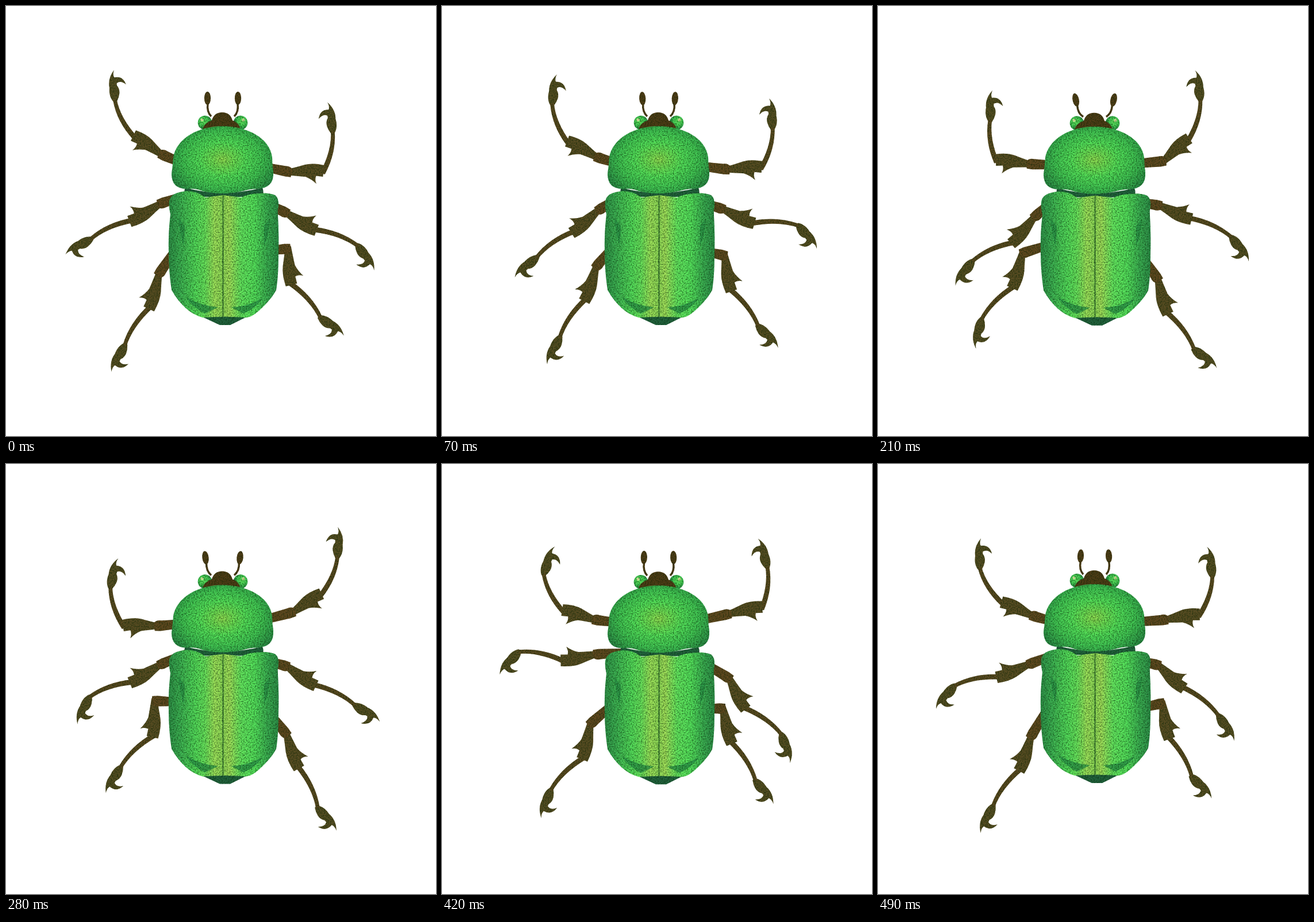
Animation, 748 px wide and 748 px high, one loop 0.56 s. Source, as an HTML page:

```html
<!DOCTYPE html>
<html lang="en">
<head>
<meta charset="utf-8">
<title>Beetle</title>
<style>
  html, body { margin: 0; width: 100%; height: 100%; overflow: hidden; background: #fff; }
  svg { display: block; width: 100vw; height: 100vh; }
  .coxa { fill: #60481f; }
  .femur { fill: #584c22; }
  .tibia { fill: #5a4920; }
  .foot { fill: #554d22; }
  .shade { fill: #2a9146; opacity: .8; }
  .dark { fill: #22633e; }
</style>
</head>
<body>
<svg viewBox="0 0 748 748">
  <defs>
    <filter id="grain" x="-5%" y="-5%" width="110%" height="110%" color-interpolation-filters="sRGB">
      <feTurbulence type="fractalNoise" baseFrequency=".45" numOctaves="2" seed="4"/>
      <feColorMatrix values="0 0 0 0 0  0 0 0 0 .12  0 0 0 0 0  1.3 0 0 0 -.5"/>
      <feComposite in2="SourceGraphic" operator="in" result="specks"/>
      <feMerge><feMergeNode in="SourceGraphic"/><feMergeNode in="specks"/></feMerge>
    </filter>
    <radialGradient id="thorax" gradientUnits="userSpaceOnUse" cx="0" cy="0" r="1"
        gradientTransform="translate(377 267) scale(98 72)">
      <stop offset="0" stop-color="#8fdc52"/>
      <stop offset=".2" stop-color="#6fdf55"/>
      <stop offset=".42" stop-color="#54e05a"/>
      <stop offset=".7" stop-color="#42c654"/>
      <stop offset="1" stop-color="#2c8f47"/>
    </radialGradient>
    <linearGradient id="wings" gradientUnits="userSpaceOnUse" x1="283" x2="474" y1="0" y2="0">
      <stop offset="0" stop-color="#2f9249"/>
      <stop offset=".1" stop-color="#3db153"/>
      <stop offset=".25" stop-color="#55dd5b"/>
      <stop offset=".33" stop-color="#69e45d"/>
      <stop offset=".42" stop-color="#9fe35b"/>
      <stop offset=".49" stop-color="#90dc58"/>
      <stop offset=".55" stop-color="#a3e15b"/>
      <stop offset=".66" stop-color="#65e860"/>
      <stop offset=".78" stop-color="#56e35d"/>
      <stop offset=".9" stop-color="#3cb053"/>
      <stop offset="1" stop-color="#2e8f49"/>
    </linearGradient>
    <radialGradient id="eye" cx=".4" cy=".4" r=".62">
      <stop offset="0" stop-color="#62e860"/>
      <stop offset=".5" stop-color="#46cf55"/>
      <stop offset="1" stop-color="#1f7d3e"/>
    </radialGradient>
    <g id="side">
      <circle cx="346" cy="203" r="12.3" fill="url(#eye)"/>
      <circle cx="341" cy="198" r="2.6" fill="#d8f0a0"/>
      <g class="antenna" fill="#503d17">
        <path d="M357 192Q349 184 351 170" fill="none" stroke="#503d17" stroke-width="3.4"/>
        <ellipse cx="350.5" cy="160.5" rx="5.6" ry="11.6"/>
      </g>
    </g>
  </defs>
  <g id="legs" filter="url(#grain)"></g>
  <g id="body" filter="url(#grain)">
    <use href="#side"/>
    <use href="#side" transform="matrix(-1 0 0 1 754 0)"/>
    <path fill="#4f3c16" d="M342 214Q344 204 358 199Q362 185 376 185Q390 185 394 199Q405 203 408 214Z"/>
    <path class="dark" d="M312 316Q376 334 446 316Q450 325 444 332H314Q308 323 312 316Z"/>
    <path fill="url(#thorax)" d="M376 209C420 209 459 230 463 263Q463 275 465 288Q467 317 437 318Q425 318 412 322Q376 330 342 322Q330 317 316 318Q288 319 288 292Q290 278 291 263C297 230 335 209 376 209Z"/>
    <path class="dark" d="M342 541Q380 535 418 541L390 555H372Z"/>
    <path fill="url(#wings)" d="M378 329L409 333Q424 326 440 326Q456 324 468 329Q475 334 474 348Q472 356 473 364Q475 400 474 430Q474 470 470 494Q462 510 440 530Q428 541 418 542Q378 539 342 542Q325 537 312 525Q298 512 288 494Q283 460 283 430Q282 395 286 362Q283 350 284 340Q286 324 314 322Q330 321 347 333Z"/>
    <path class="shade" d="M300 369L311 383L309 417Q302 397 300 369ZM459 371L449 382L449 416Q457 400 459 371Z"/>
    <path class="shade" d="M313 506Q338 521 369 524L346 535Q325 525 313 506ZM447 508Q420 523 392 524L413 535Q433 527 447 508Z"/>
    <path d="M377.5 330V540" stroke="#2f6a2c" stroke-width="1.6"/>
  </g>
</svg>
<script>
  const STEP = 70;
  const timeline = [0, .5, 1, 2, 3, 3.5, 4, 5]; // pose position at each step
  const bodySag = [0, 0, .8, 1.5, 2.2, 0];
  const antennaTilt = [0, -6.5, -12, -6.5, 1.5, 3.5];

  const FEMUR = "M-4-5Q14-7 28-9Q38-13 47-22Q44-14 47-8L59-10L62 10Q42 15 28 12Q12 8-3 5Z";
  const FOOT = "M-4-3C3-9 12-10 20-9Q36-12 51 0Q43-3 38 0Q41 15 25 20Q33 11 28 4L24 4Q18 9 10 8Q3 7-4 3Z";
  const tibiaShape = n => `M-5-4Q${n / 2}-15 ${n}-4V3Q${n * .55}-7-5 5Z`;

  const legsGroup = document.getElementById("legs");
  const body = document.getElementById("body");
  const legs = [];

  const mix = (a, b, k) => a + (b - a) * k;
  const sample = (keys, at) => {
    const i = Math.floor(at), next = keys[Math.min(i + 1, keys.length - 1)];
    return Array.isArray(next)
      ? next.map((v, j) => mix(keys[i][j], v, at - i))
      : mix(keys[i], next, at - i);
  };

  function addPart(name, d) {
    const path = document.createElementNS("http://www.w3.org/2000/svg", "path");
    path.setAttribute("class", name);
    if (d) path.setAttribute("d", d);
    return legsGroup.appendChild(path);
  }

  // Each pose: knee x, knee y, then the angles of femur, tibia and foot.
  function addLeg(side, hip, femur, tibia, poses) {
    const foot = addPart("foot", FOOT), shin = addPart("tibia", tibiaShape(tibia));
    const thigh = addPart("femur", FEMUR), coxa = addPart("coxa");
    legs.push({ side, hip, femur, tibia, poses, parts: { coxa, thigh, shin, foot } });
  }

  const place = (part, x, y, angle, side, stretch = 1) => part.setAttribute("transform",
    `translate(${x} ${y}) rotate(${angle}) scale(${stretch} ${side})`);

  const along = (x, y, angle, n) => {
    const a = angle * Math.PI / 180;
    return [x + n * Math.cos(a), y + n * Math.sin(a)];
  };

  function poseLeg({ side, hip, femur, tibia, poses, parts }, at) {
    const [x, y, a, b, c] = sample(poses, at);
    const dx = hip[0] - x, dy = hip[1] - y, reach = Math.hypot(dx, dy);
    const knee = along(x, y, a, femur), ankle = along(...knee, b, tibia);
    parts.coxa.setAttribute("d", `M-5-5Q0-11 9-9L${reach}-7V7L6 9L-4 8Z`);
    place(parts.coxa, x, y, Math.atan2(dy, dx) * 180 / Math.PI, side);
    place(parts.thigh, x, y, a, side, femur / 60);
    place(parts.shin, ...knee, b, side);
    place(parts.foot, ...ankle, c, side);
  }

  addLeg(1, [315, 277], 58, 71, [
    [270, 258, 214, 243, 268], [268, 268, 203, 254, 290], [263, 275, 187, 262, 274],
    [262, 282, 181, 252, 285], [265, 271, 197, 243, 292], [268, 264, 204, 238, 272]]);
  addLeg(-1, [430, 276], 59, 71, [
    [493, 289, -2, -77, -100], [501, 280, -7, -72, -93], [497, 270, -42, -74, -100],
    [499, 258, -33, -67, -89], [499, 261, -12, -83, -108], [501, 271, -9, -72, -100]]);
  addLeg(-1, [318, 328], 61, 75, [
    [268, 344, 150, 155, 149], [276, 366, 129, 134, 127], [272, 367, 131, 155, 125],
    [268, 349, 149, 160, 114], [267, 331, 170, 191, 130], [263, 348, 158, 168, 129]]);
  addLeg(1, [445, 340], 60, 77, [
    [488, 360, 30, 21, 56], [489, 346, 19, -14, 46], [490, 347, 23, 25, 54],
    [489, 352, 34, 27, 33], [500, 373, 62, 36, 73], [488, 350, 42, 39, 58]]);
  addLeg(-1, [302, 414], 63, 77, [
    [266, 466, 106, 123, 117], [270, 441, 112, 124, 114], [251, 430, 106, 134, 101],
    [258, 412, 93, 136, 120], [258, 452, 103, 135, 109], [266, 474, 109, 126, 115]]);
  addLeg(1, [452, 426], 63, 77, [
    [491, 422, 85, 49, 37], [493, 446, 74, 57, 57], [487, 475, 74, 54, 39],
    [488, 470, 70, 65, 50], [489, 425, 76, 58, 52], [495, 416, 79, 60, 47]]);

  const antenna = document.querySelector(".antenna");
  const start = performance.now();
  let shown = -1;

  function draw() {
    const step = Math.floor((performance.now() - start) / STEP) % timeline.length;
    if (step !== shown) {
      const at = timeline[step];
      legs.forEach(leg => poseLeg(leg, at));
      body.setAttribute("transform", `translate(0 ${sample(bodySag, at)})`);
      antenna.setAttribute("transform", `rotate(${sample(antennaTilt, at)} 357 192)`);
      shown = step;
    }
    requestAnimationFrame(draw);
  }
  draw();
</script>
</body>
</html>
```
